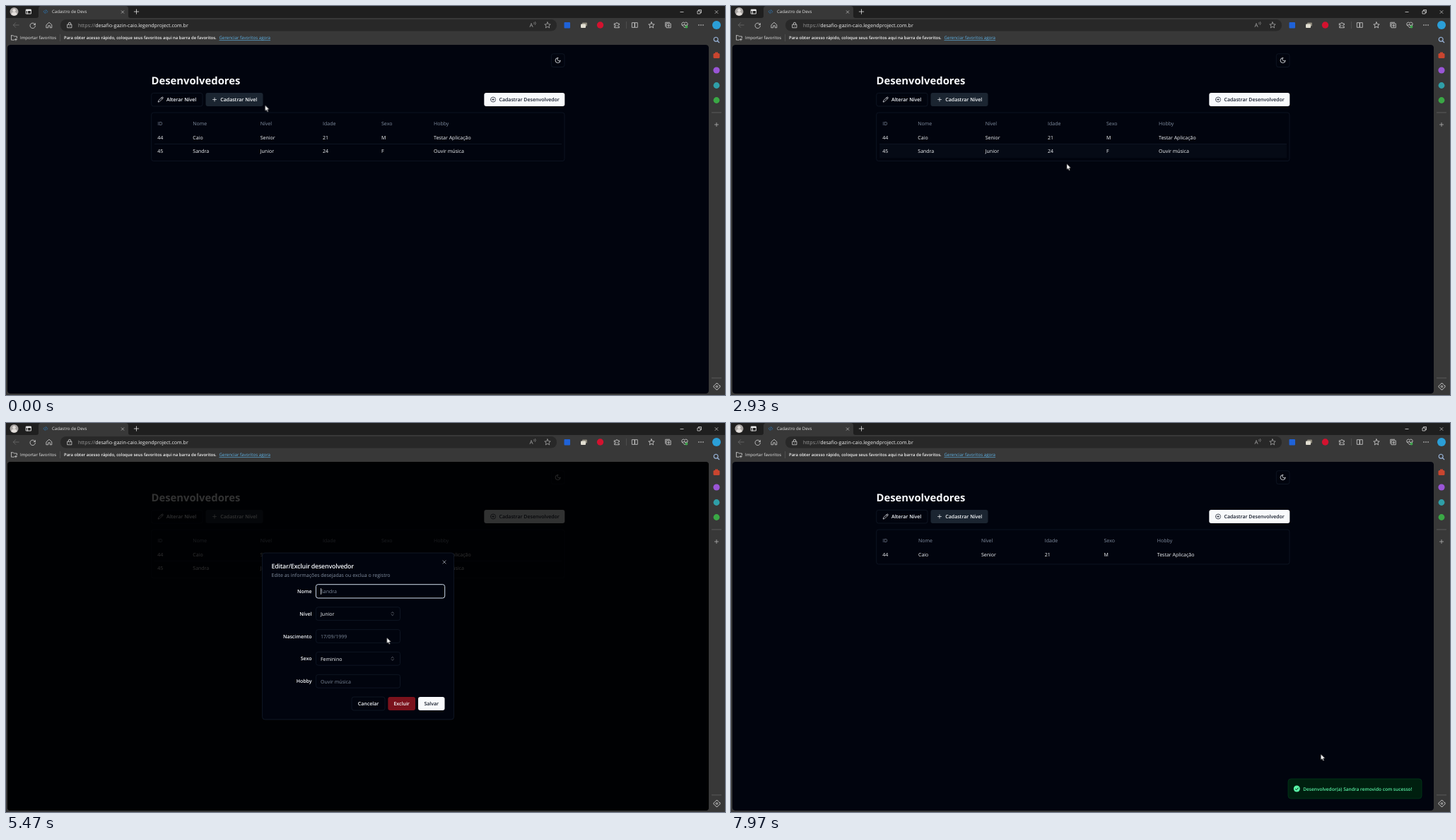
An HTML page that plays this animation: 1017x551 px, repeating every 8000 ms.

```html
<!DOCTYPE html>
<html lang="pt-BR">
<head>
<meta charset="utf-8">
<title>Cadastro de Devs</title>
<style>
  html, body { margin: 0; width: 100%; height: 100%; overflow: hidden; background: #383838; }
  svg { display: block; width: 1017px; height: 551px; }
  text { font-family: "Open Sans", "Noto Sans", sans-serif; text-rendering: geometricPrecision; white-space: pre; }
</style>
</head>
<body>
<svg id="stage" viewBox="0 0 1017 551" xmlns="http://www.w3.org/2000/svg"></svg>
<script>
const LOOP = 8000;
const PAGE = '#01040e', LINE = '#141c2a', WHITE = '#f8fafc', MUTED = '#8490a2', ICON = '#d6d6d6';

// Drawing helpers: y of a text is the middle of its capitals
const text = (x, y, str, o = {}) => {
  const { size = 7, weight = 400, fill = WHITE, anchor = 'start', extra = '' } = o;
  return `<text x="${x}" y="${y + size * 0.36}" font-size="${size}" font-weight="${weight}" fill="${fill}" text-anchor="${anchor}" ${extra}>${str}</text>`;
};
const box = (x1, y1, x2, y2, fill = 'none', r = 0, stroke = 'none', sw = 0.7) =>
  `<rect x="${x1}" y="${y1}" width="${x2 - x1}" height="${y2 - y1}" rx="${r}" fill="${fill}" stroke="${stroke}" stroke-width="${sw}"/>`;
const dot = (x, y, r, fill, extra = '') => `<circle cx="${x}" cy="${y}" r="${r}" fill="${fill}" ${extra}/>`;
const group = (id, body, extra = '') => `<g id="${id}" ${extra}>${body}</g>`;
// Icons live on a 24 unit grid
const icon = (x, y, d, color = ICON, size = 9, sw = 2, fill = 'none') =>
  `<path transform="translate(${x - size / 2} ${y - size / 2}) scale(${size / 24})" d="${d}" fill="${fill}" stroke="${color}" stroke-width="${sw}" stroke-linecap="round" stroke-linejoin="round"/>`;

const ICONS = {
  moon: 'M12 3a6 6 0 0 0 9 9 9 9 0 1 1-9-9Z',
  pencil: 'M17 3a2.85 2.83 0 1 1 4 4L7.5 20.5 2 22l1.5-5.5ZM15 5l4 4',
  plus: 'M5 12h14M12 5v14',
  addRound: 'M2 12a10 10 0 1 0 20 0a10 10 0 1 0-20 0M8 12h8M12 8v8',
  upDown: 'm7 15 5 5 5-5M7 9l5-5 5 5',
  close: 'M18 6 6 18M6 6l12 12',
  back: 'M22 12H3M11 4l-8 8 8 8',
  reload: 'M20 6v5h-5M20 11a9 9 0 1 0 .5 4',
  home: 'M3 11 12 3l9 8v10h-6v-7H9v7H3Z',
  lock: 'M5 10h14v11H5ZM8 10V7a4 4 0 0 1 8 0v3M12 15v1',
  star: 'm12 2 3 7 7 .6-5.300 4.700 1.700 7.200L12 17.500 5.600 21.500l1.700-7.200L2 9.600 9 9Z',
  puzzle: 'M4 7h5a3 3 0 1 1 6 0h5v5a3 3 0 1 0 0 5v4H4v-5a3 3 0 1 0 0-4Z',
  split: 'M3 4h8v16H3ZM13 4h8v16h-8Z',
  stack: 'M7 7h14v14H7ZM17 3H3v14M14 10v8M10 14h8',
  heart: 'M12 21 3 12a5 5 0 0 1 9-7 5 5 0 0 1 9 7ZM3 12h6l2-4 3 7 2-3h5',
  search: 'M3 10a7 7 0 1 0 14 0a7 7 0 1 0-14 0M15 15l6 6',
  folder: 'M2 4h7l3 3h10v6M2 4v16h10M18 15v7M14 18h8',
  code: 'm8 6-6 6 6 6M16 6l6 6-6 6M14 4l-4 16',
  tabs: 'M3 4h18v16H3ZM3 8h18M8 8v12'
};
const gear = Array.from({ length: 16 }, (_, i) => {
  const a = (i - 0.5) * Math.PI / 8, r = i % 4 < 2 ? 11 : 8.5;
  return `${i ? 'L' : 'M'}${12 + r * Math.cos(a)} ${12 + r * Math.sin(a)}`;
}).join('') + 'ZM9 12a3 3 0 1 0 6 0a3 3 0 1 0-6 0';

function browser() {
  const bar = [
    [14, 'back', '#6c6c6c'], [38, 'reload'], [61, 'home'], [90, 'lock'], [766, 'star', '#a8a8a8'],
    [864, 'puzzle'], [889.5, 'split'], [913, 'star'], [936.5, 'stack'], [960, 'heart']
  ];
  return box(0, 0, 1017, 551, '#383838') + box(0, 0, 1017, 17, '#1f1f1f')
    + '<path d="M43 17q3 0 3-3V4q0-4 4-4h119q4 0 4 4v10q0 3 3 3Z" fill="#383838"/>'
    + dot(11.5, 8, 6, '#a9a5a3') + dot(11.5, 6.3, 2.2, '#e4dfdc')
    + '<path d="M7.500 12q0-3.500 4-3.500t4 3.500q-4 3-8 0Z" fill="#e4dfdc"/>'
    + icon(32, 8, ICONS.tabs, '#eee', 9, 2.4) + box(29, 5, 35, 6.6, '#eee')
    + icon(56, 8, ICONS.code, '#2b78b8', 7.5, 2)
    + text(65, 8, 'Cadastro de Devs', { size: 6.1, fill: '#e2e2e2' })
    + icon(165, 8.500, ICONS.close, '#ddd', 7, 2) + icon(184.500, 8, ICONS.plus, '#ddd', 11, 1.800)
    + '<path d="M953.500 8.500h5M978 7h4v4h-4ZM979.500 7V5.500h4v4H982" fill="none" stroke="#eee" stroke-width=".7"/>'
    + icon(1005, 8.500, ICONS.close, '#eee', 8, 1.800)
    + box(77, 19, 779, 35.500, '#282828', 8)
    + bar.map(([x, name, color]) => icon(x, 27, ICONS[name], color, 10, 1.900)).join('')
    + text(102, 27, '<tspan fill="#9c9c9c">https://</tspan>desafio-gazin-caio.legendproject.com.br', { size: 7.08, fill: '#f0f0f0' })
    + text(740.500, 27.500, 'A', { size: 8, fill: '#a8a8a8' })
    + '<path d="M746.500 23q1.500 1.300 0 3M748.300 22.200q2 2 0 4.600" fill="none" stroke="#a8a8a8" stroke-width=".6"/>'
    + box(789.500, 23, 798, 31.500, '#1f62d8', 1)
    + box(815, 23.500, 822, 28.500, '#8b877a', 1) + box(813, 25.500, 820, 31, '#e2dfd2', 1)
    + dot(840.500, 27, 4.700, '#d3122f')
    + box(877, 22, 877.700, 32, '#555')
    + [980, 983, 986].map(x => dot(x, 27, 0.8, ICON)).join('')
    + dot(962.5, 29.5, 1.9, '#3fa34d')
    + dot(1005, 27, 6, '#2b9fd8')
    + icon(11.500, 45, ICONS.folder, '#ddd', 9.500, 1.900)
    + text(20, 45.200, 'Importar favoritos', { size: 6, fill: '#e8e8e8' })
    + box(76, 40, 76.700, 50, '#565656')
    + text(82, 45.200, 'Para obter acesso rápido, coloque seus favoritos aqui na barra de favoritos.', { size: 5.95, weight: 600, fill: '#f2f2f2' })
    + text(301.500, 45.200, 'Gerenciar favoritos agora', { size: 6.15, fill: '#5fb4e8', extra: 'text-decoration="underline"' })
    + icon(1005, 48, ICONS.search, '#9db9e0', 10, 2.600)
    + box(1000.500, 67, 1009.500, 74, '#c9452f', 1.500) + box(1003, 65.500, 1007, 67, '#c9452f')
    + dot(1005, 91, 4.600, '#9a55d6') + dot(1005, 112.500, 4.400, '#2f9fa8') + dot(1005, 133.500, 4.400, '#3aa845')
    + box(998, 150.600, 1012, 151.300, '#666') + icon(1005, 168, ICONS.plus, '#ccc', 9, 1.700)
    + box(998, 526.600, 1012, 527.300, '#666') + icon(1005.500, 539, gear, '#ddd', 10, 1.900);
}

function table(cols, rows, bottom) {
  const line = (cells, y, style) => cells.map((c, i) => text(cols[i], y, c, style)).join('');
  return box(205.700, 151, 790, bottom, 'none', 3, LINE)
    + line(['ID', 'Nome', 'Nível', 'Idade', 'Sexo', 'Hobby'], 166, { fill: MUTED, weight: 500 })
    + rows.map((r, i) => line(r, 186 + i * 19.700)).join('')
    + (rows.length > 1 ? box(210, 195.200, 786, 195.900, LINE) : '');
}

function page() {
  const first = ['44', 'Caio', 'Senior', '21', 'M', 'Testar Aplicação'];
  const second = ['45', 'Sandra', 'Junior', '24', 'F', 'Ouvir música'];
  const bold = { weight: 600 };
  return box(2, 55, 994, 549, PAGE, 4)
    + box(771.300, 67.700, 790, 86.500, 'none', 3, LINE) + icon(780.600, 77, ICONS.moon, WHITE, 9.500)
    + text(205.500, 105.800, 'Desenvolvedores', { size: 14.8, weight: 700 })
    + box(205.700, 123.300, 278, 142, 'none', 3, LINE) + icon(218.700, 132.500, ICONS.pencil, WHITE, 8.500)
    + text(227, 132.500, 'Alterar Nível', bold)
    + box(282.500, 123, 363.500, 142, '#1b2531', 3) + icon(295, 132.500, ICONS.plus, WHITE, 8.500)
    + text(303.300, 132.500, 'Cadastrar Nível', bold)
    + box(676.300, 123, 790.300, 142, WHITE, 3) + icon(689, 132.500, ICONS.addRound, '#111827', 8.500)
    + text(697.500, 132.500, 'Cadastrar Desenvolvedor', { weight: 600, fill: '#111827' })
    + group('row1', box(210, 176, 786, 195.500, '#0c131f'))
    + group('row2', box(210, 195.500, 786, 215, '#0c131f'))
    + group('full', table([214.300, 264.300, 359.700, 448, 531, 605], [first, second], 219.600))
    + group('less', table([214.300, 265, 354, 443.800, 527.500, 602.800], [first], 200));
}

function dialog() {
  const fields = [
    ['Nome', 'Sandra', 238.400, 620.500], ['Nível', 'Junior', 270.200, 557.500, true], ['Nascimento', '17/09/1999', 302, 557.500],
    ['Sexo', 'Feminino', 333.800, 557.500, true], ['Hobby', 'Ouvir música', 365.800, 557.500]
  ];
  const button = (x1, x2, label, fill, color, stroke) =>
    box(x1, 388, x2, 407, fill, 3, stroke) + text((x1 + x2) / 2, 397.500, label, { weight: 600, fill: color, anchor: 'middle' });
  return box(362.600, 184, 633.400, 420, PAGE, 3.500, '#182233')
    + text(375.500, 202.300, 'Editar/Excluir desenvolvedor', { size: 8.9, weight: 600, extra: 'letter-spacing="-.025em"' })
    + text(375.500, 215.200, 'Edite as informações desejadas ou exclua o registro', { fill: MUTED })
    + icon(620, 197, ICONS.close, '#b4b9c2', 8.500)
    + fields.map(([label, value, y, right, select]) =>
      text(432.500, y, label, { weight: 600, anchor: 'end' })
      + box(438.600, y - 9.400, right, y + 9.400, 'none', 3, LINE)
      + text(445, y + 0.300, value, { fill: select ? WHITE : '#7f8a9a' })
      + (select ? icon(546.700, y, ICONS.upDown, '#8b929e', 7.500) : '')).join('')
    + group('focus', box(438.400, 228.700, 620.700, 248, 'none', 3, '#cbd5e1', 1)
      + group('caret', box(445, 234, 445.700, 243, WHITE)))
    + button(489, 536, 'Cancelar', 'none', WHITE, LINE)
    + group('remove', button(540.300, 579, 'Excluir', '#7b121c', WHITE, 'none'))
    + button(583, 620.500, 'Salvar', WHITE, '#111827', 'none');
}

const toast = () => box(788, 504, 977, 532, '#001f0f', 4, '#003d1c')
  + dot(800.300, 518, 4.500, '#59f3a6')
  + '<path d="M798.200 518.200l1.500 1.500 2.800-3" fill="none" stroke="#001f0f" stroke-width="1"/>'
  + text(809.300, 518.200, 'Desenvolvedor(a) Sandra removido com sucesso!', { size: 6.55, weight: 600, fill: '#59f3a6' });

const arrow = '<path d="M0 0V8.300L1.900 6.600 3.200 9.500 4.600 8.900 3.300 6.100H5.900Z" fill="#fff" stroke="#111" stroke-width=".5"/>';
const hand = '<path d="M-1 .8q0-.8.8-.8t.8.800V4.300l1.200.2 1.200.2 1.300.3q1.200.3 1.200 1.500 0 2.500-.9 3.500v1.700H-.2V10.300Q-2.600 8-2.900 6.400q.3-1.100 1.900.4Z" fill="#fff" stroke="#111" stroke-width=".5"/>';

document.getElementById('stage').innerHTML =
  '<clipPath id="view"><rect x="2" y="55" width="992" height="494" rx="4"/></clipPath>'
  + browser()
  + `<g clip-path="url(#view)">${page()}`
  + group('shade', box(2, 55, 994, 549, '#000'))
  + group('dialog', dialog(), 'style="transform-origin:498px 302px"')
  + group('toast', toast()) + '</g>'
  + group('cursor', group('arrow', arrow) + group('hand', hand));

// Steps: [time, value, easing towards the next step]
function play(id, prop, steps) {
  const all = [[0, steps[0][1]], ...steps, [LOOP, steps[steps.length - 1][1]]];
  document.getElementById(id).animate(
    all.map(([t, v, easing = 'linear']) => ({ offset: t / LOOP, [prop]: v, easing })),
    { duration: LOOP, iterations: Infinity });
}
// Hard on/off switching at the given times
const toggle = (id, start, ...times) => {
  let v = start;
  play(id, 'opacity', [[0, v], ...times.flatMap(t => [[t, v], [t, v = 1 - v]])]);
};

const OPEN = 4000, SHUT = 6525, FADE = 200;
const during = (off, on) => [[OPEN, off, 'ease'], [OPEN + FADE, on], [SHUT, on, 'ease'], [SHUT + FADE, off]];

play('shade', 'opacity', during(0, 0.8));
play('dialog', 'opacity', during(0, 1));
play('dialog', 'transform', during('translate(0px, 4.7px) scale(.95)', 'translate(0px, 0px) scale(1)'));
toggle('focus', 1, 6450);
toggle('caret', 1, 4600, 5100, 5600, 6100);
play('remove', 'opacity', [[6150, 1], [6280, 0.9]]);

play('row1', 'opacity', [[2620, 0], [2740, 1], [2760, 1], [2890, 0]]);
play('row2', 'opacity', [[2740, 0], [2860, 0.8], [3010, 0], [3480, 0], [3630, 1], [OPEN, 1], [OPEN + 150, 0]]);
toggle('full', 1, 6780);
toggle('less', 0, 6780);

play('toast', 'opacity', [[6700, 0, 'ease'], [7100, 1]]);
play('toast', 'transform', [[6700, 'translateY(36px)', 'ease'], [7100, 'translateY(0px)']]);

const at = (t, x, y, easing) => [t, `translate(${x}px, ${y}px)`, easing];
play('cursor', 'transform', [
  at(30, 366.500, 140.500, 'ease-in-out'), at(830, 462, 141, 'ease-in-out'), at(1160, 498.300, 115.500),
  at(2270, 498.300, 115.500, 'ease-in'), at(2930, 475, 223.500, 'ease-out'), at(3130, 467.500, 217),
  at(3400, 467.500, 217, 'ease-in-out'), at(3830, 519.300, 207.500),
  at(4800, 519.300, 240, 'ease-in-out'), at(6300, 566.500, 396),
  at(6800, 566.500, 396, 'ease-in-out'), at(7800, 834.300, 469)
]);
toggle('cursor', 1, 4150, 4850);
toggle('arrow', 1, 6200, 6700);
toggle('hand', 0, 6200, 6700);
</script>
</body>
</html>
```
